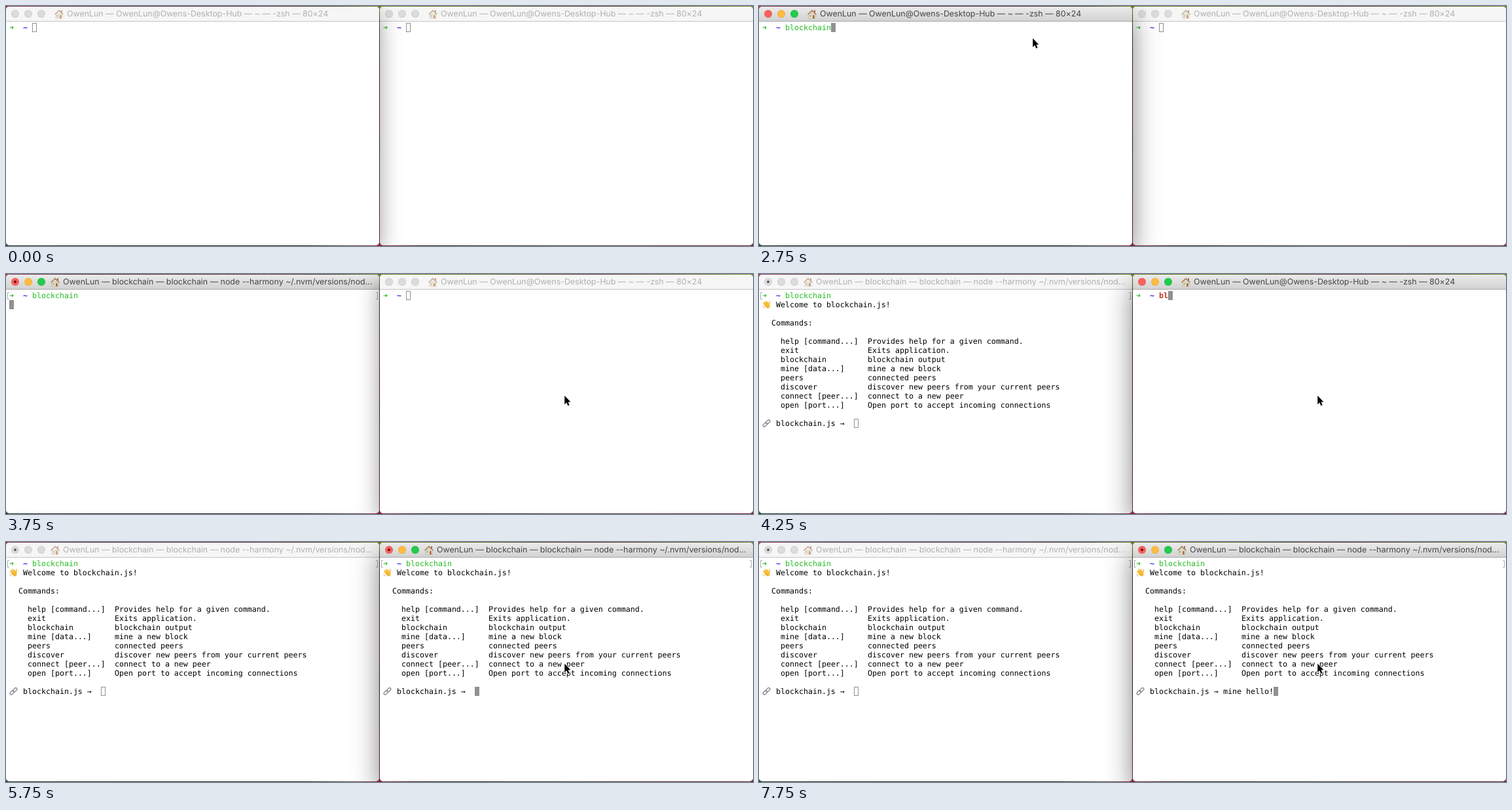
An HTML page that plays this animation: 1141x368 px, repeating every 8 s.

```html
<!DOCTYPE html>
<html lang="en">
<head>
<meta charset="utf-8">
<title>Two terminals</title>
<style>
html, body { margin: 0; width: 100%; height: 100%; overflow: hidden; }
#stage {
  position: relative; width: 1141px; height: 368px; overflow: hidden;
  background:
    linear-gradient(#7a8a38 0, #5c5a2c 20px, #5e2830 90px, #6a1c24 185px, #26301c 215px, #34482a 240px, #6c2c3c 290px, #8a3450 355px, #c43a68 368px) 568px 0 / 5px 368px no-repeat,
    linear-gradient(90deg, #a04a64, #5c3438 12%, #684044 35%, #4e4430 44%, #7c9a34 50%, #6a7c30 64%, #6c3a3c 78%, #7f9a38) 0 0 / 1141px 8px no-repeat,
    linear-gradient(90deg, #2c5040, #3a3a3a 10%, #2c2c2c 40%, #777 46%, #c43a68 50%, #3a2c30 56%, #555 75%, #8a2c40) 0 360px / 1141px 8px no-repeat,
    #444;
}
.win, .win > *, .mouse { position: absolute; }
.win { top: 0; width: 570px; height: 367px; }
.frame {
  left: 0; top: 1px; width: 570px; height: 366px; border-radius: 5px;
  background: #fff; box-shadow: 0 12px 34px rgba(0, 0, 0, .4);
}
.bar {
  left: 0; top: 1px; width: 570px; height: 22px; border-radius: 5px 5px 0 0;
  background: #f6f6f6; border-bottom: 1px solid #c4c4c4;
}
.on .frame { box-shadow: 0 16px 40px rgba(0, 0, 0, .5); }
.on .bar { background: linear-gradient(#ebebeb, #d2d2d2); border-color: #a9a9a9; }
.dot {
  top: 6px; width: 12px; height: 12px; border-radius: 50%;
  background: #dcdcdc; box-shadow: inset 0 0 0 1px #d2d2d2;
}
.on .dot { background: var(--hue); box-shadow: inset 0 0 0 1px rgba(0, 0, 0, .07); }
.busy { left: 12px; top: 10px; width: 4px; height: 4px; border-radius: 50%; background: #5c5c5c; }
.on .busy { background: #5f0906; }
.title {
  top: 4px; font: 12.42px/16px Inter, Roboto, sans-serif; color: #b0b0b0;
  white-space: pre; text-rendering: geometricPrecision; font-feature-settings: "calt" 0;
}
.on .title { color: #444; }
.home { top: 5px; opacity: .6; }
.on .home { opacity: 1; }
.cell {
  font: 11.627px/14px "DejaVu Sans Mono", "Liberation Mono", monospace;
  white-space: pre; color: #000; text-rendering: geometricPrecision;
}
.bold { font-weight: bold; }
.mark { top: 28px; width: 2px; height: 9px; border: 1px solid #acacac; }
.open { left: 2px; border-right: 0; }
.close { left: 565px; border-left: 0; }
.caret { width: 7px; height: 14px; box-sizing: border-box; border: 1px solid #919191; }
.on .caret { background: #919191; }
.mouse { left: 0; top: 0; z-index: 5; }
svg { display: block; overflow: visible; }
</style>
</head>
<body>
<div id="stage">
  <div class="win" style="left:0"></div>
  <div class="win" style="left:571px"></div>
  <svg class="mouse" width="12" height="18">
    <path d="M1.2 .6V13.9L4.2 11.1L6.4 16L8.6 15L6.5 10.3H10.4Z" fill="#000" stroke="#fff" stroke-width="1.8" stroke-linejoin="round" paint-order="stroke"/>
  </svg>
</div>
<script>
const LOOP = 8000;
const GREEN = '#25bc24', RED = '#c23621', BLUE = '#3a26dd';
const COMMAND = 'blockchain', ENTRY = 'mine hello!';
const IDLE_TITLE = 'OwenLun — OwenLun@Owens-Desktop-Hub — ~ — -zsh — 80×24';
const BUSY_TITLE = 'OwenLun — blockchain — blockchain — node --harmony ~/.nvm/versions/nod…';

const HELP = [
  ['help [command...]', 'Provides help for a given command.'],
  ['exit', 'Exits application.'],
  ['blockchain', 'blockchain output'],
  ['mine [data...]', 'mine a new block'],
  ['peers', 'connected peers'],
  ['discover', 'discover new peers from your current peers'],
  ['connect [peer...]', 'connect to a new peer'],
  ['open [port...]', 'Open port to accept incoming connections']
];

const HOUSE = `<path d="M2 7H12V14H2Z" fill="#efe2c4" stroke="#b8a283" stroke-width=".6"/>
  <path d="M10 1.5H12V5H10Z" fill="#9c6b4a"/>
  <path d="M0 7.6L7 .8L14 7.6L13 8.6L7 3.2L1 8.6Z" fill="#ae8058"/>
  <path d="M3.4 9H6V11.5H3.4Z" fill="#8fabbd"/><path d="M8 9H10.6V14H8Z" fill="#a06a40"/>`;
const HAND = `<g fill="none" stroke="#f6bd3a" stroke-width="2" stroke-linecap="round">
  <path d="M5 9L2.2 5.4M6 7.6L3.4 3.2M7.6 6.6L5.6 2.4M9 6.2L8 3.4M10 8.5L11 4.6"/></g>
  <path d="M4 8L8.5 5.4L11.4 8.2Q12 12 9.4 12.6Q7 13 4 9.4Z" fill="#f6bd3a"/>
  <path d="M5.4 8.2Q7 10.6 9 11M1 9Q1.4 11.6 3.6 12.4M10 1.4Q12 2 12.4 3.6" fill="none" stroke="#c98a2a" stroke-width=".7"/>`;
const LINK = `<g fill="none" stroke="#8b9094" stroke-width="1.4">
  <rect x="-3.6" y="-2" width="7.2" height="4" rx="2" transform="translate(4.3 9) rotate(-45)"/>
  <rect x="-3.6" y="-2" width="7.2" height="4" rx="2" transform="translate(8.7 4.7) rotate(-45)"/></g>`;

// Each step changes part of the state; n = typed letters, phase = prompt, running, menu
const steps = [
  [0, { mouse: null, front: 0, focus: -1, n: [0, 0], phase: [0, 0], entry: 0 }],
  [250, { mouse: [405, 56] }],
  [750, { mouse: [417, 49] }],
  [1500, { focus: 0 }],
  [1750, { n: [1, 0] }],
  [2000, { n: [3, 0] }],
  [2250, { n: [6, 0] }],
  [2500, { n: [9, 0] }],
  [2750, { n: [10, 0] }],
  [3250, { phase: [1, 0] }],
  [3500, { mouse: [847, 183] }],
  [3750, { mouse: [852, 186], front: 1 }],
  [4000, { focus: 1, phase: [2, 0] }],
  [4250, { n: [10, 2] }],
  [4500, { n: [10, 5] }],
  [4750, { n: [10, 7] }],
  [5000, { n: [10, 10] }],
  [5250, { phase: [2, 1] }],
  [5750, { phase: [2, 2] }],
  [6500, { entry: 3 }],
  [6750, { entry: 5 }],
  [7000, { entry: 6 }],
  [7250, { entry: 8 }],
  [7500, { entry: 10 }],
  [7750, { entry: 11 }]
];

const wins = document.querySelectorAll('.win');
const mouse = document.querySelector('.mouse');

const spot = (col, row) => `left:${5 + 7 * col}px;top:${26 + 14 * row}px`;
const cell = (col, row, text, color = '#000', cls = '') =>
  `<span class="cell ${cls}" style="${spot(col, row)};color:${color}">${text}</span>`;
const icon = (art, style, cls = '') =>
  `<svg class="${cls}" style="${style}" width="14" height="14">${art}</svg>`;

function chrome(busy) {
  const dots = ['#fc605b', '#fdbc40', '#22cb4c'].map((hue, i) =>
    `<i class="dot" style="left:${8 + 20 * i}px;--hue:${hue}"></i>`).join('');
  const x = busy ? 68 : 74;
  return '<div class="frame"></div><div class="bar"></div>' + dots +
    (busy ? '<i class="busy"></i><i class="mark open"></i><i class="mark close"></i>' : '') +
    icon(HOUSE, `left:${x}px`, 'home') +
    `<span class="title" style="left:${x + 19}px">${busy ? BUSY_TITLE : IDLE_TITLE}</span>`;
}

function menu(entry) {
  return icon(HAND, spot(0, 1)) + cell(3, 1, 'Welcome to blockchain.js!') +
    cell(2, 3, 'Commands:') +
    HELP.map(([name, info], i) => cell(4, 5 + i, name) + cell(23, 5 + i, info)).join('') +
    icon(LINK, spot(0, 14)) + cell(3, 14, 'blockchain.js →') +
    cell(19, 14, ENTRY.slice(0, entry));
}

function terminal(n, phase, entry) {
  const known = n === COMMAND.length;
  const caret = [[5 + n, 0], [0, 1], [entry ? 19 + entry : 20, 14]][phase];
  return chrome(phase > 0) +
    cell(0, 0, '➜', GREEN, 'bold') + cell(3, 0, '~', BLUE, 'bold') +
    `<i class="caret" style="${spot(...caret)}"></i>` +
    cell(5, 0, COMMAND.slice(0, n), known ? GREEN : RED, known ? '' : 'bold') +
    (phase === 2 ? menu(entry) : '');
}

function draw(s) {
  wins.forEach((win, i) => {
    win.className = s.focus === i ? 'win on' : 'win';
    win.style.zIndex = s.front === i ? 2 : 1;
    win.innerHTML = terminal(s.n[i], s.phase[i], i ? s.entry : 0);
  });
  mouse.style.display = s.mouse ? 'block' : 'none';
  if (s.mouse) mouse.style.transform = `translate(${s.mouse[0]}px, ${s.mouse[1]}px)`;
}

const start = performance.now();
let shown = 0;

function tick() {
  const t = (performance.now() - start) % LOOP;
  const count = steps.filter(([at]) => at <= t).length;
  if (count !== shown) {
    shown = count;
    draw(Object.assign({}, ...steps.slice(0, count).map(step => step[1])));
  }
  requestAnimationFrame(tick);
}
tick();
</script>
</body>
</html>
```
